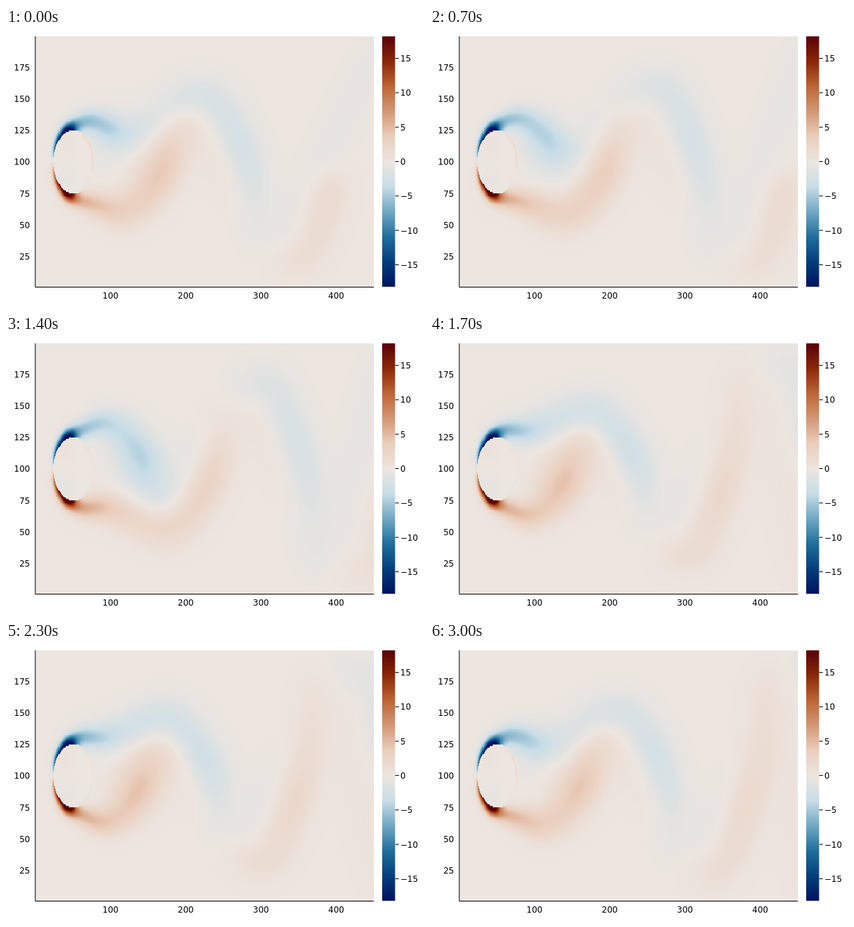
Animation, 600 px wide and 400 px high, one loop 3100 ms. Source, as an HTML page with a canvas:

```html
<!DOCTYPE html>
<html lang="en">
<head>
<meta charset="utf-8">
<title>Vortex street</title>
<style>
  html, body { margin: 0; width: 100%; height: 100%; overflow: hidden; background: #fff; }
  #stage { position: relative; width: 600px; height: 400px; }
  canvas { position: absolute; left: 42px; top: 12px; width: 486px; height: 360px; image-rendering: pixelated; }
  svg { position: absolute; left: 0; top: 0; }
  text { font: 12px "DejaVu Sans", sans-serif; }
</style>
</head>
<body>
<div id="stage">
  <canvas id="field" width="450" height="200"></canvas>
  <svg id="axes" width="600" height="400">
    <defs><linearGradient id="bar" x1="0" y1="1" x2="0" y2="0"></linearGradient></defs>
    <rect x="540" y="12" width="18.5" height="359" fill="url(#bar)"/>
    <path d="M42 12V371.5H528" fill="none" stroke="#000" stroke-width="1"/>
  </svg>
</div>
<script>
const W = 450, H = 200, DX = 1.08, DY = 1.8, LEFT = 42, MID = 180;
const PERIOD = 6.047, FRAMES = 31, STEP = 100, LIMIT = 18.2;
const STOPS = ['001261', '033e7d', '1e6f9d', '71a8c4', 'c9dde7', 'ece5e0',
  'eacebd', 'd39774', 'be6533', '8b2706', '590008'];

// Each feature of a shed vortex: x, y from the centre line, strength, at the given ages.
const AGES = [-8, -6, -4, -3, -2, -1, 0, 1, 3, 6, 9];
const TROUGH = [[84, 43, 7], [88, 47, 7], [110, 58, 6], [122, 61, 5.2], [135, 64, 4.4], [152, 68, 3.6],
  [175, 72, 3], [206, 78, 2.6], [282, 101, 1.6], [405, 148, .7], [545, 165, .4]];
const FLANK = [[86, 45, 7], [96, 53, 6.6], [140, 54, 4.3], [160, 42, 3.7], [179, 26, 3.5], [200, 18, 3.5],
  [226, 14, 3.4], [255, 12, 3.2], [337, 20, 2.6], [467, 25, 2.3], [610, 20, 1.6]];
const CREST = [[98, 54, 6.5], [135, 62, 4.4], [178, 66, 2.5], [192, 42, 1.6], [205, 2, 1], [228, -52, .9],
  [263, -60, .7], [293, -74, .6], [385, -118, .5], [505, -150, .4], [650, -160, .3]];
const ORIGIN = [84, 43, 7];

const ctx = document.getElementById('field').getContext('2d');
const image = ctx.createImageData(W, H);
const field = new Float32Array(W * H), still = new Float32Array(W * H), solid = new Uint8Array(W * H);
const xAt = i => LEFT + (i + .5) * DX;
const yAt = j => (j + .5) * DY - MID;
const gauss = (v, s) => Math.exp(-v * v / (2 * s * s));
const mix = (a, b, u) => a + (b - a) * u;
const radius = (x, y) => Math.hypot((x - 97) / 29, y / 45.5);

const rgb = STOPS.map(h => [0, 2, 4].map(k => parseInt(h.substr(k, 2), 16)));
const palette = Array.from({ length: 1025 }, (_, n) => {
  const p = n / 1024 * 10, k = Math.min(9, Math.floor(p));
  return rgb[k].map((v, c) => mix(v, rgb[k + 1][c], p - k));
});

function sample(keys, age) {
  const a = Math.max(AGES[0], Math.min(AGES[AGES.length - 1], age));
  let k = 0;
  while (k < AGES.length - 2 && a > AGES[k + 1]) k++;
  const u = (a - AGES[k]) / (AGES[k + 1] - AGES[k]);
  return keys[k].map((v, c) => mix(v, keys[k + 1][c], u));
}

function spline(a, b, c, d, u) {
  return .5 * (2 * b + (c - a) * u + (2 * a - 5 * b + 4 * c - d) * u * u + (3 * b - a - 3 * c + d) * u * u * u);
}

function splat(x, y, s, amp) {
  const i0 = Math.max(0, Math.floor((x - 3.3 * s - LEFT) / DX)), i1 = Math.min(W, Math.ceil((x + 3.3 * s - LEFT) / DX));
  const j0 = Math.max(0, Math.floor((y - 3.3 * s + MID) / DY)), j1 = Math.min(H, Math.ceil((y + 3.3 * s + MID) / DY));
  if (i1 <= i0) return;
  const row = [];
  for (let i = i0; i < i1; i++) row.push(gauss(xAt(i) - x, s));
  for (let j = j0; j < j1; j++) {
    const g = amp * gauss(yAt(j) - y, s);
    for (let i = i0; i < i1; i++) field[j * W + i] += g * row[i - i0];
  }
}

// One shear layer, rolled up downstream; side 1 is the lower one.
function ribbon(time, side) {
  const pts = [ORIGIN, ORIGIN];
  for (let a = (time + 8.5) % PERIOD - 8.5; a < 12; a += PERIOD) {
    const core = sample(FLANK, a);
    pts.push(sample(TROUGH, a), core, sample(CREST, a));
    const amp = 1.3 * Math.exp(-(((a + 1.5) / 2.5) ** 2));
    if (amp > .02) splat(core[0] - 15, side * (core[1] - 10), 28, side * amp);
  }
  for (let k = 1; k < pts.length - 2; k++) {
    const [p, q, r, s] = pts.slice(k - 1, k + 3);
    const n = Math.max(1, Math.ceil(Math.hypot(r[0] - q[0], r[1] - q[1]) / 5));
    const at = u => [0, 1].map(c => spline(p[c], q[c], r[c], s[c], u));
    for (let m = 0; m < n; m++) {
      const [x0, y0] = at(m / n), [x1, y1] = at((m + 1) / n), x = (x0 + x1) / 2;
      const size = Math.max(5, Math.min(20, 5 + (x - 84) * .16));
      const amp = mix(q[2], r[2], (m + .5) / n) * Math.hypot(x1 - x0, y1 - y0) / (size * 2.507);
      splat(x, side * (y0 + y1) / 2, size, side * amp);
    }
  }
}

// Steady part: boundary layer on the front, faint tints inside the cylinder.
function steady(x, y) {
  const r = radius(x, y), side = Math.sign(y), h = Math.abs(y);
  if (r < 1) {
    const tint = .6 * gauss(x - 84, 9) * gauss(h - 26, 12);
    const rim = x > 97 ? .8 * gauss(r - .95, .04) * gauss(h - 28, 10) : 0;
    return -side * (tint + rim);
  }
  const angle = Math.atan2(h / 45.5, (97 - x) / 29);
  const amp = 22 * Math.sin(angle) ** .8 / (1 + Math.exp((angle - 1.57) / .14));
  return side * amp * Math.exp(-(((r - 1) / (.1 + .07 * angle)) ** 1.4));
}

for (let j = 0; j < H; j++) for (let i = 0; i < W; i++) {
  still[j * W + i] = steady(xAt(i), yAt(j));
  solid[j * W + i] = radius(xAt(i), yAt(j)) < 1 ? 1 : 0;
}

function draw(frame) {
  field.fill(0);
  ribbon(frame, 1);
  ribbon(frame + PERIOD / 2, -1);
  const swing = Math.cos(2 * Math.PI * (frame - .5) / PERIOD);
  for (let j = 0; j < H; j++) for (let i = 0; i < W; i++) {
    const n = j * W + i, x = xAt(i), y = yAt(j);
    let v = still[n] + (solid[n] ? 0 : field[n]);
    if (x > 105 && x < 135 && Math.abs(y) < 70)
      v += 2 * swing * gauss(radius(x, y) - .97, .045) * gauss(y + 10 * swing, 20);
    const c = palette[Math.round(Math.max(0, Math.min(1, .5 + v / (2 * LIMIT))) * 1024)];
    image.data.set(c, n * 4);
    image.data[n * 4 + 3] = 255;
  }
  ctx.putImageData(image, 0, 0);
}

const axes = document.getElementById('axes');
function add(parent, tag, attrs, label) {
  const el = document.createElementNS('http://www.w3.org/2000/svg', tag);
  for (const k in attrs) el.setAttribute(k, attrs[k]);
  if (label !== undefined) el.textContent = label;
  parent.appendChild(el);
}
STOPS.forEach((c, k) => add(document.getElementById('bar'), 'stop', { offset: k / 10, 'stop-color': '#' + c }));
for (let v = 100; v <= 400; v += 100)
  add(axes, 'text', { x: LEFT + v * DX, y: 388, 'text-anchor': 'middle' }, v);
for (let v = 25; v <= 175; v += 25)
  add(axes, 'text', { x: 34.5, y: 196.4 - (v - 100) * 1.809, 'text-anchor': 'end' }, v);
for (let v = -15; v <= 15; v += 5) {
  const y = 191.5 - v * 9.86;
  add(axes, 'path', { d: `M558.5 ${y}h5.5`, stroke: '#000' });
  add(axes, 'text', { x: 566, y: y + 4.4 }, v < 0 ? '\u2212' + -v : v);
}

let shown = -1;
function tick() {
  const frame = Math.floor(performance.now() / STEP) % FRAMES;
  if (frame !== shown) draw(shown = frame);
  requestAnimationFrame(tick);
}
tick();
</script>
</body>
</html>
```
